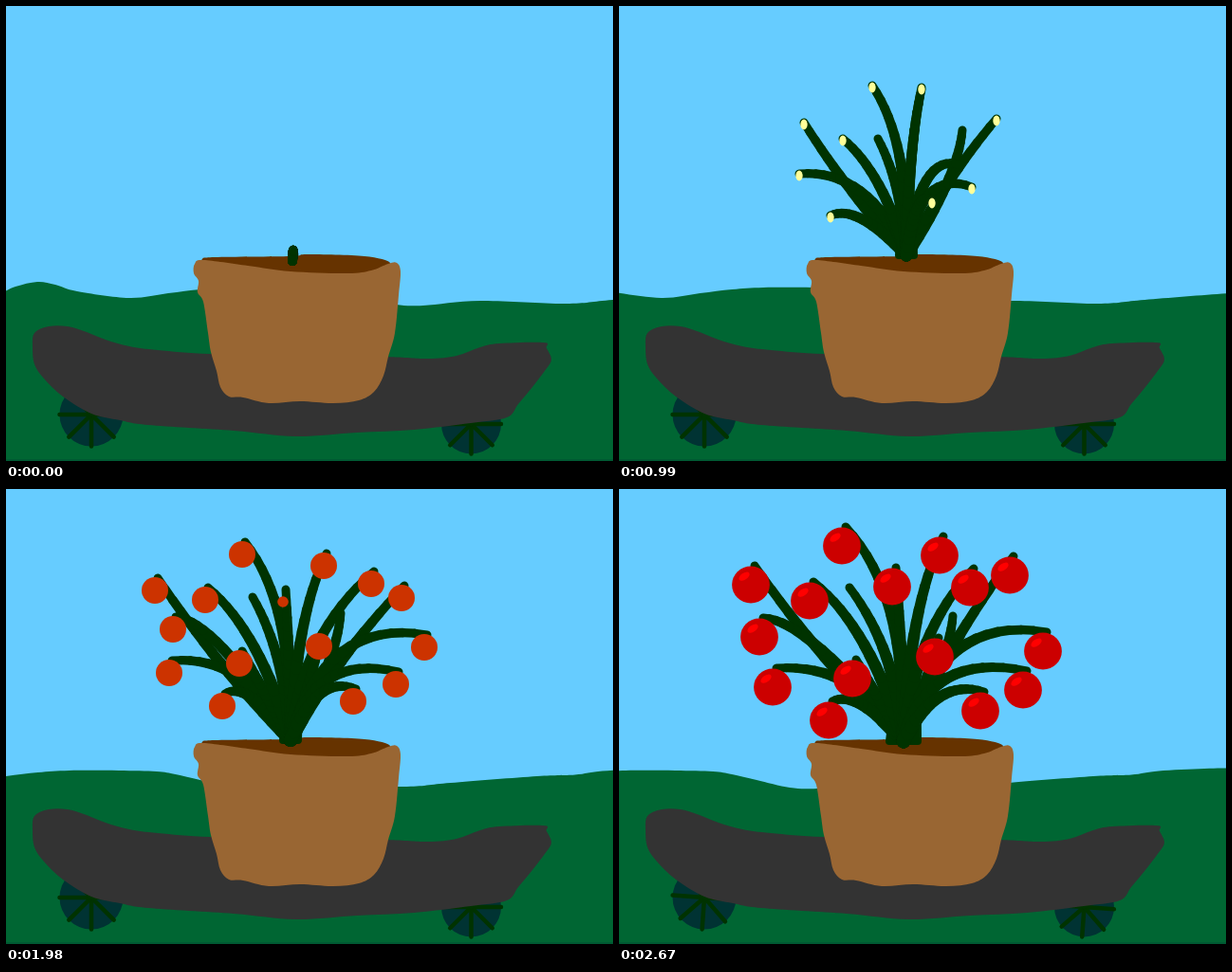
Recreate the animation shown at these times as an HTML page with a canvas. Size 640x480 px, loop 2700 ms.

```html
<!DOCTYPE html>
<html>
<head>
<meta charset="utf-8">
<title>Rolling plant</title>
<style>
  html, body { margin: 0; width: 100%; height: 100%; overflow: hidden; }
  canvas { display: block; }
</style>
</head>
<body>
<canvas id="stage" width="640" height="480"></canvas>
<script>
const ctx = document.getElementById('stage').getContext('2d');
const STEP = 30, STEPS = 90;
const KEYS = [0, 360, 990, 1350, 1980, 2670];
const WOOD = '#003300';

const HILL = [-60, 306, -10, 303, 10, 296, 33, 291, 52, 294, 75, 301, 130, 308, 171, 303, 205, 299,
  238, 297, 290, 297, 330, 298, 350, 301, 376, 307, 411, 315, 440, 316, 500, 311, 590, 314,
  640, 310, 731, 303, 771, 301.5, 800, 297.5, 848, 295, 880, 295, 930, 300, 930, 560, -60, 560];
const BOARD = [30, 345, 45, 338, 65, 338, 85, 344, 105, 352, 130, 359, 160, 363, 215, 367, 300, 368,
  400, 370, 445, 372, 475, 369, 500, 360, 520, 356, 567, 355, 570, 361, 575, 373, 568, 385,
  555, 402, 540, 420, 528, 434, 490, 440, 430, 447, 370, 450, 305, 454, 240, 448, 150, 442,
  120, 437, 90, 430, 60, 412, 40, 393, 30, 378, 28, 360];
const POT = [208, 268, 199, 272, 198, 282, 203, 290, 202, 302, 208, 312, 213, 345, 216, 365,
  222, 385, 226, 402, 235, 412, 250, 413, 277, 419, 310, 417, 345, 419, 372, 416, 388, 407,
  398, 390, 403, 370, 410, 345, 414, 305, 416, 280, 412, 271, 403, 272, 385, 279, 360, 282,
  300, 280, 255, 274];
const SOIL = [207, 267, 220, 265, 300, 264, 318, 262, 378, 264, 405, 271, 385, 281, 355, 284,
  300, 282, 250, 276, 212, 271];

// Each branch: control point as a share of root-to-tip, bloom time, and points for the last keys.
const branches = [];
const grow = (bendX, bendY, bloom, ...points) => branches.push({ bendX, bendY, bloom, points });
const FIRST = 800, NEVER = Infinity;
grow(.56, .46, FIRST, 195, 125, 174, 111, 157, 107, 139, 101);
grow(.67, .98, 1500, 215, 165, 176, 148, 148, 156);
grow(.36, 1.07, FIRST, 248, 217, 190, 179, 175, 184, 172, 194, 162, 209);
grow(.65, 1.3, FIRST, 262, 207, 223, 223, 227, 223, 228, 229, 221, 244);
grow(.5, .5, 1150, 285, 225, 247, 175, 246, 184, 246, 200);
grow(.37, .71, FIRST, 236, 142, 230, 142, 210, 117, 201, 118);
grow(.14, .6, NEVER, 273, 140, 277, 125, 260, 114, 243, 104);
grow(-.08, .68, FIRST, 317, 180, 267, 86, 276, 65, 249, 69, 235, 60);
grow(.1, .5, 1950, 303, 160, 292, 119, 288, 103);
grow(.15, .66, 1150, 319, 90, 332, 80, 335, 81, 338, 70);
grow(.15, .64, FIRST, 320, 170, 319, 88, 375, 83, 385, 100, 370, 104);
grow(.6, .5, 1600, 320, 190, 330, 166, 333, 177);
grow(.92, .62, NEVER, 317, 195, 362, 131, 361, 124, 353, 131, 352, 134);
grow(.4, .53, FIRST, 317, 195, 398, 121, 415, 114, 417, 115, 412, 91);
grow(.25, 1.17, 1150, 360, 170, 411, 149, 441, 167, 447, 171);
grow(.2, 1.29, FIRST, 350, 192, 372, 193, 389, 193, 411, 206, 426, 212);
grow(.4, 1.3, FIRST, 330, 208, 362, 206, 366, 224, 381, 234);

const mix = (a, b, p) => a + (b - a) * p;

function track(values, t) {
  let i = 0;
  while (i < KEYS.length - 2 && t >= KEYS[i + 1]) i++;
  return mix(values[i], values[i + 1], (t - KEYS[i]) / (KEYS[i + 1] - KEYS[i]));
}

// Closed smooth curve through all points.
function blob(points, color) {
  const n = points.length / 2;
  const at = i => [points[(i + n) % n * 2], points[(i + n) % n * 2 + 1]];
  ctx.beginPath();
  ctx.moveTo(...at(0));
  for (let i = 0; i < n; i++) {
    const [a, b, c, d] = [at(i - 1), at(i), at(i + 1), at(i + 2)];
    ctx.bezierCurveTo(b[0] + (c[0] - a[0]) / 6, b[1] + (c[1] - a[1]) / 6,
      c[0] - (d[0] - b[0]) / 6, c[1] - (d[1] - b[1]) / 6, ...c);
  }
  ctx.fillStyle = color;
  ctx.fill();
}

function oval(x, y, rx, ry, color, turn = 0) {
  ctx.beginPath();
  ctx.ellipse(x, y, rx, ry, turn, 0, 2 * Math.PI);
  ctx.fillStyle = color;
  ctx.fill();
}

function line(x1, y1, x2, y2, width) {
  ctx.beginPath();
  ctx.moveTo(x1, y1);
  ctx.lineTo(x2, y2);
  ctx.lineWidth = width;
  ctx.stroke();
}

function wheel(x, y, r, turn) {
  oval(x, y, r, r, '#003333');
  for (let i = 0; i < 8; i++) {
    const a = turn + i * Math.PI / 4;
    line(x, y, x + r * Math.cos(a), y + r * Math.sin(a), 4.5);
  }
}

function branchShape(root, branch, t) {
  const { points, bendX, bendY, bloom } = branch;
  const missing = KEYS.length - points.length / 2;
  const axis = k => track(KEYS.map((_, i) => {
    if (i >= missing) return points[(i - missing) * 2 + k];
    return i ? root[k] : [303, 258][k];
  }), t);
  const x = axis(0), y = axis(1);
  const fruits = bloom !== NEVER;
  const tipX = x + (fruits ? track([0, 0, 0, 0, 3, 4], t) : 0);
  const tipY = y - (fruits ? track([0, 0, 2, 3, 13, 20], t) : 0);
  return { x, y, tipX, tipY, bloom,
    cx: mix(root[0], tipX, bendX), cy: mix(root[1], tipY, bendY) };
}

function drawBranch(root, b, t) {
  const taper = track([1, 2, 4, 5, 5, 6], t), parts = 16;
  let [px, py] = root;
  for (let i = 1; i <= parts; i++) {
    const s = i / parts;
    const x = mix(mix(root[0], b.cx, s), mix(b.cx, b.tipX, s), s);
    const y = mix(mix(root[1], b.cy, s), mix(b.cy, b.tipY, s), s);
    line(px, py, x, y, 9 + taper * (1 - s));
    [px, py] = [x, y];
  }
}

function drawFruit(b, t) {
  if (t < b.bloom) return;
  const size = Math.min(1, .35 + (t - b.bloom) / 450);
  const ry = size * track([6, 6, 7, 7, 14, 19.5], t);
  const rx = ry * track([.68, .68, .68, .68, 1, 1.02], t);
  const shade = values => Math.max(0, Math.round(track(values, t) / 51) * 51);
  const color = [
    shade([255, 255, 255, 255, 204, 204]),
    shade([255, 255, 255, 255, 51, -31]),
    shade([255, 255, 153, 0, 0, 0])
  ];
  oval(b.x, b.y, rx, ry, `rgb(${color})`);
  if (t >= 2200) oval(b.x - .35 * rx, b.y - .45 * ry, .32 * rx, .18 * ry, '#ff0000', -.6);
}

function drawPlant(t) {
  const root = [track([302, 306, 303, 303, 300, 300], t), track([269, 263, 263, 263, 265, 266], t)];
  const half = track([.5, 1, 8, 6, 8, 15], t);
  const top = track([262, 240, 208, 205, 208, 195], t);
  const shapes = branches.map(b => branchShape(root, b, t));
  ctx.strokeStyle = ctx.fillStyle = WOOD;
  ctx.lineWidth = 8;
  ctx.beginPath();
  ctx.moveTo(root[0] - half, root[1]);
  ctx.lineTo(304 - half * .7, top);
  ctx.lineTo(304 + half * .7, top);
  ctx.lineTo(root[0] + half, root[1]);
  ctx.closePath();
  ctx.fill();
  ctx.stroke();
  shapes.forEach(b => drawBranch(root, b, t));
  shapes.forEach(b => drawFruit(b, t));
}

function draw() {
  const step = Math.floor(performance.now() / STEP) % STEPS;
  const t = step * STEP;
  ctx.lineCap = ctx.lineJoin = 'round';
  ctx.fillStyle = '#66ccff';
  ctx.fillRect(0, 0, 640, 480);
  ctx.save();
  ctx.translate(-.0865 * t, 0);
  blob(HILL, '#006633');
  ctx.restore();
  ctx.fillStyle = '#005a33';
  ctx.fillRect(0, 478, 640, 2);

  const turn = step / 11 * Math.PI / 4;
  ctx.strokeStyle = WOOD;
  wheel(90, 431, 33.5, turn);
  wheel(490.5, 441, 31.5, turn);
  blob(BOARD, '#333333');
  blob(SOIL, '#663300');
  blob(POT, '#996633');
  drawPlant(t);
  requestAnimationFrame(draw);
}
draw();
</script>
</body>
</html>
```
